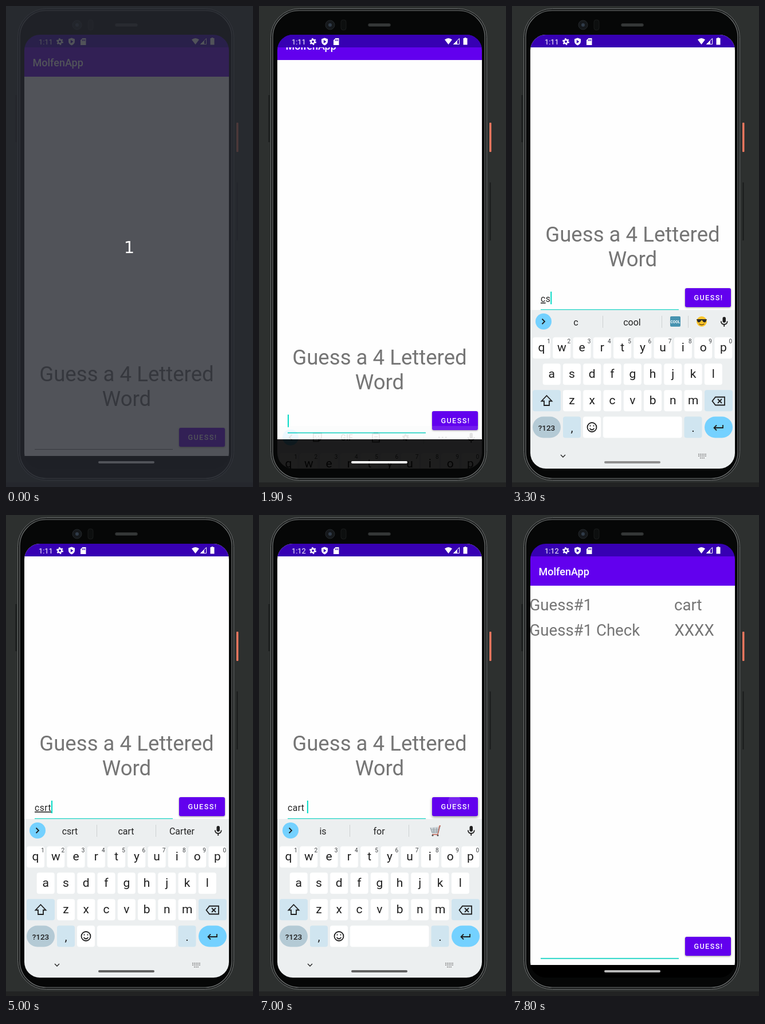
An HTML page that plays this animation: 431x837 px, repeating every 8000 ms.

```html
<!DOCTYPE html>
<html lang="en">
<head>
<meta charset="utf-8">
<title>Word guessing app</title>
<style>
  html, body { margin: 0; height: 100%; overflow: hidden; background: #2d302f; }
  svg { display: block; font-family: Roboto, sans-serif; }
  text { white-space: pre; }
  .mid { text-anchor: middle; }
  .line { fill: none; stroke: #1f1f1f; stroke-width: 1.8; }
  .key { font-size: 21px; fill: #1f1f1f; }
  .hint { font-size: 10px; fill: #3c4043; }
  .word { font-size: 16px; fill: #222; }
  .title { font-size: 36.6px; fill: #757575; }
  .row { font-size: 27.6px; fill: #757575; }
  .button { font-size: 12.6px; font-weight: 500; letter-spacing: 1.45px; fill: #fff; }
  #field { font-size: 15.66px; letter-spacing: .49px; fill: #222; }
  #field .composing { text-decoration: underline; }
</style>
</head>
<body>
<svg width="431" height="837" viewBox="0 0 431 837">
  <defs>
    <clipPath id="screen"><rect x="32" y="50" width="357" height="755" rx="27"/></clipPath>
    <clipPath id="buttonShape"><rect x="302" y="734" width="80" height="33" rx="3"/></clipPath>
    <g id="gear" fill="none">
      <circle r="3.2" stroke-width="2.4"/>
      <circle r="5" stroke-width="2" stroke-dasharray="2.6 2.636"/>
    </g>
  </defs>

  <g id="phone">
    <rect width="431" height="837" fill="#2d302f"/>
    <rect y="829" width="431" height="8" fill="#222323"/>
    <path d="M17.5 155V237M403.5 307V408" stroke="#191b1b" stroke-width="2"/>
    <rect x="402" y="203" width="3.5" height="51" rx="1" fill="#e8765f"/>
    <rect x="20.5" y="4.5" width="377" height="821" rx="50" fill="#1b1d1d" stroke="#6b6e6e"/>
    <rect x="24" y="8" width="370" height="814" rx="46" fill="#060707" stroke="#6f7272" stroke-width="1.2"/>
    <circle cx="124" cy="33" r="8" fill="#15181b" stroke="#25292c"/>
    <circle cx="124" cy="33" r="3" fill="#303b48"/>
    <rect x="143" y="24" width="9" height="18" rx="4" fill="#0d0f0f" stroke="#191b1b"/>
    <rect x="190.500" y="30.500" width="39" height="5" rx="2.500" fill="#353838" stroke="#242626"/>
  </g>

  <g clip-path="url(#screen)">
    <rect x="32" y="50" width="357" height="755" fill="#000"/>
    <g id="app">
      <rect x="32" y="123" width="357" height="660" fill="#fefefe"/>
      <rect x="32" y="72" width="357" height="51" fill="#6200ee"/>
      <text x="46.500" y="105" font-size="18" font-weight="500" fill="#fff">MolfenApp</text>
      <g id="prompt" class="title mid">
        <text x="210.500" y="653">Guess a 4 Lettered</text>
        <text x="210.500" y="696">Word</text>
      </g>
      <g id="result" class="row">
        <text x="30.500" y="166">Guess#1</text><text x="283" y="166">cart</text>
        <text x="30.500" y="210">Guess#1 Check</text><text x="283.500" y="210">XXXX</text>
      </g>
      <rect id="underline" x="50" width="241"/>
      <text id="field" x="50" y="758"></text>
      <rect id="cursor" y="740" width="2" height="22" fill="#03dac5"/>
      <rect id="button" x="302" y="734" width="80" height="33" rx="3" fill="#6200ee"/>
      <circle id="ripple" cx="341" cy="741" fill="#fff" clip-path="url(#buttonShape)"/>
      <text class="button mid" x="343" y="755">GUESS!</text>
    </g>

    <g id="status" fill="#fff">
      <rect x="32" y="50" width="357" height="22" fill="#3700b3"/>
      <text id="clock" x="57" y="66.500" font-size="12.8"></text>
      <use href="#gear" x="94" y="62" stroke="#fff"/>
      <path d="M114.500 55.500L120 57.500V61.500Q120 66 114.500 68.500Q109 66 109 61.500V57.500Z"/>
      <path d="M112.800 59L117.500 62L112.800 65Z" fill="#3700b3"/>
      <path d="M133.500 56H139.500V68H130V59.500Z"/>
      <path d="M133.500 58V61M135.500 58V61M137.500 58V61" stroke="#3700b3"/>
      <path d="M324 58.500Q330.500 53.500 337 58.500L330.500 67Z"/>
      <path d="M349.500 56.500V66.500H339.500Z" fill="none" stroke="#fff"/>
      <path d="M346 60V67H339Z"/>
      <path d="M358.500 56V55H361.500V56H363.500V67.500H356.500V56Z"/>
    </g>

    <g id="keyboard">
      <rect x="32" y="529" width="357" height="276" fill="#eceff0"/>
      <g id="strip"></g>
      <circle cx="55" cy="549" r="14" fill="#74d1ff"/>
      <path id="chevron" class="line" d="M-2.500 -4.500L2 0L-2.500 4.500"/>
      <rect x="367.500" y="541" width="5.500" height="10" rx="2.700" fill="#1f1f1f"/>
      <path class="line" stroke-width="1.500" d="M364.800 548.500Q365 554 370.200 554Q375.500 554 375.700 548.500M370.200 554V558"/>
      <g id="keys"></g>
      <path class="line" d="M60.500 678L69.500 687.500H65V695H56V687.500H51.500Z"/>
      <path class="line" d="M355 680.500H371V694.500H355L349.500 687.500ZM359 684L366 691M366 684L359 691"/>
      <circle class="line" cx="139.500" cy="733" r="8"/>
      <path class="line" d="M135.500 735Q139.500 740 143.500 735M136.500 729.500V731.500M142.500 729.500V731.500"/>
      <path class="line" d="M368 729V734H353M357 729.500L352.500 734L357 738.500"/>
      <path class="line" stroke="#555" style="stroke-width:1.3" d="M85 781L89 785L93 781"/>
      <path stroke="#777" stroke-width="1.600" stroke-dasharray="1.800 1.200" d="M325 780H339.500M325 783H339.500M328 786.500H336"/>
    </g>
    <rect id="handle" x="161" y="792" width="98" height="4" rx="2"/>
  </g>

  <g id="countdown">
    <rect width="431" height="837" fill="#262930" opacity=".8"/>
    <text class="mid" x="215" y="430" font-size="29" fill="#fff" style="font-family:'DejaVu Sans',sans-serif">1</text>
  </g>
</svg>

<script>
const LOOP = 8000, PAN = 243, KEYBOARD_HEIGHT = 276;
const el = id => document.getElementById(id);
const clamp = x => Math.min(1, Math.max(0, x));
const ramp = (t, start, length) => clamp((t - start) / length);
const smooth = x => x * x * (3 - 2 * x);
const within = (t, a, b) => t >= a && t < b;
const set = (id, attrs) => {
  for (const name in attrs) el(id).setAttribute(name, attrs[name]);
};
const show = (id, on) => set(id, { visibility: on ? 'visible' : 'hidden' });
const label = (x, y, text, cls) => `<text class="mid ${cls}" x="${x}" y="${y}">${text}</text>`;
const divider = x => `<path d="M${x}.500 539V560" stroke="#cdd1d2"/>`;

// Keyboard
const keyShape = (x, y, width = 31, fill = '#fff', radius = 4) =>
  `<rect x="${x}" y="${y}" width="${width}" height="37" rx="${radius}" fill="${fill}"/>`;
const keyRow = (letters, x, y, hints = '') => [...letters].map((letter, i) => {
  const center = x + 35.27 * i;
  return keyShape(center - 15.5, y) + label(center, y + 24.5, letter, 'key') +
    (hints ? label(center + 12.5, y + 10, hints[i], 'hint') : '');
}).join('');
const PALE = '#d0e5f0';
el('keys').innerHTML =
  keyRow('qwertyuiop', 51.5, 576.5, '1234567890') +
  keyRow('asdfghjkl', 69.2, 622.3) +
  keyRow('zxcvbnm', 104.5, 668.3) +
  keyShape(36, 668.3, 49, PALE) + keyShape(336, 668.3, 49, PALE) +
  keyShape(36, 714.5, 49, '#b4cad5', 18.5) + keyShape(89, 714.5, 31, PALE) +
  keyShape(124, 714.5) + keyShape(159, 714.5, 137.5) +
  keyShape(300.5, 714.5, 31, PALE) + keyShape(336, 714.5, 49, '#74d1ff', 18.5) +
  '<text class="mid" x="60.5" y="739" font-size="13.5" font-weight="500" fill="#1f1f1f">?123</text>' +
  label(104.5, 741, ',', 'key') + label(316, 741, '.', 'key');

// Strip above the keys
const words = (...list) => divider(158) + divider(261) +
  list.map((word, i) => label([111.5, 209.5, 307][i], 556, word, 'word')).join('');
const tools = `
  <g fill="none" stroke="#444" stroke-width="1.8">
    <path d="M95 542H109V551L104 556H95ZM104 556V551H109M98.500 546V548M104 546V548M98.500 551H102"/>
    <path d="M198 543H210V557H198ZM201 543V541H207V543M201 548H207M201 552H207"/>
    <use href="#gear" x="256" y="549"/>
    <path d="M313 549H328" stroke-dasharray="2.500 3.500" stroke-width="2.500"/>
  </g>${divider(287)}
  <text class="mid" x="153" y="554" font-size="14" font-weight="700" fill="#444">GIF</text>`;
const coolStrip = words('c', 'cool') + divider(307) + `
  <rect x="276" y="540" width="18" height="18" rx="2" fill="#4793b0"/>
  <text class="mid" x="285" y="551.5" font-size="6.5" font-weight="700" fill="#fff">COOL</text>
  <circle cx="331" cy="549" r="9" fill="#fbc52c"/>
  <path d="M322 545H340L338 550Q334 552 332 547H330Q328 552 324 550Z" fill="#2b2b2b"/>
  <path d="M326.500 553Q331 556.500 335.500 553" fill="none" stroke="#6b4a12" stroke-width="1.300"/>`;
const cartStrip = words('is', 'for') + `
  <path d="M299 544L302 553H313L316 542" fill="#cfd6da" stroke="#87939a"/>
  <path d="M301 547H314M302 550H313M305 544V553M310 544V553" stroke="#87939a" stroke-width=".800"/>
  <path d="M317 541H315L312 556H302" fill="none" stroke="#c2604f" stroke-width="1.300"/>
  <circle cx="303" cy="557.500" r="1.500" fill="#555"/><circle cx="312" cy="557.500" r="1.500" fill="#555"/>`;
const carterStrip = words('csrt', 'cart', 'Carter');
const pressed = '<rect x="159" y="529" width="103" height="40" fill="#d9dddf"/>' + carterStrip;

// Start time, typed text, number of underlined letters, strip
const typing = [
  [0, '', 0, tools],
  [2700, 'c', 0, tools],
  [2800, 'c', 0, coolStrip],
  [2900, 'c', 1, coolStrip],
  [3300, 'cs', 1, coolStrip],
  [3600, 'csr', 2, words('cs', 'is', 'case')],
  [3800, 'csrt', 3, words('csr', 'car', 'cars')],
  [4000, 'csrt', 4, carterStrip],
  [5700, 'csrt', 4, pressed],
  [5900, 'cart ', 0, cartStrip],
  [7200, '', 0, cartStrip]
];
const cursorOff = [[0, 1600], [4500, 5000], [5500, 5900], [6400, 7000], [7700, LOOP]];

let current;
function showTyping(state) {
  if (state === current) return;
  current = state;
  const [, text, marked, strip] = state;
  el('field').innerHTML =
    `<tspan class="composing">${text.slice(0, marked)}</tspan>${text.slice(marked)}`;
  el('strip').innerHTML = strip;
  set('cursor', { x: 50 + (text ? el('field').getComputedTextLength() : 0) });
  set('chevron', { transform: `translate(55 549) scale(${strip === tools ? -1 : 1} 1)` });
}

function draw(ms) {
  const t = Math.floor(ms / 100) * 100;
  showTyping(typing.findLast(state => t >= state[0]));
  show('countdown', t < 100);
  show('prompt', t < 7200);
  show('result', t >= 7200);
  show('cursor', !cursorOff.some(([a, b]) => within(t, a, b)));
  el('clock').textContent = t < 6200 ? '1:11' : '1:12';

  const focused = t >= 1600;
  set('underline', {
    y: focused ? 770.8 : 771, height: focused ? 1.8 : 1, fill: focused ? '#15d3c3' : '#858585'
  });

  const open = ramp(t, 1810, 420) - ramp(t, 7150, 400);
  const shift = smooth(open);
  set('app', { transform: `translate(0 ${-Math.round(PAN * shift)})` });
  set('keyboard', {
    transform: `translate(0 ${KEYBOARD_HEIGHT * (1 - open) ** 1.3})`, opacity: shift
  });

  const raised = within(t, 7000, 7500);
  el('button').style.filter = `drop-shadow(0 ${raised ? 2 : 1}px ${raised ? 2.5 : 1.5}px #0006)`;
  set('ripple', {
    r: t < 7000 ? 0 : 11 + 50 * ramp(t, 7000, 250),
    opacity: .14 * (1 - ramp(t, 7200, 500))
  });

  const grey = Math.round(255 - 157 * ramp(t, 2300, 1400) + 157 * ramp(t, 7300, 900));
  set('handle', { fill: `rgb(${grey},${grey},${grey})` });
}

const start = performance.now();
function tick() {
  draw((performance.now() - start) % LOOP);
  requestAnimationFrame(tick);
}
tick();
</script>
</body>
</html>
```
